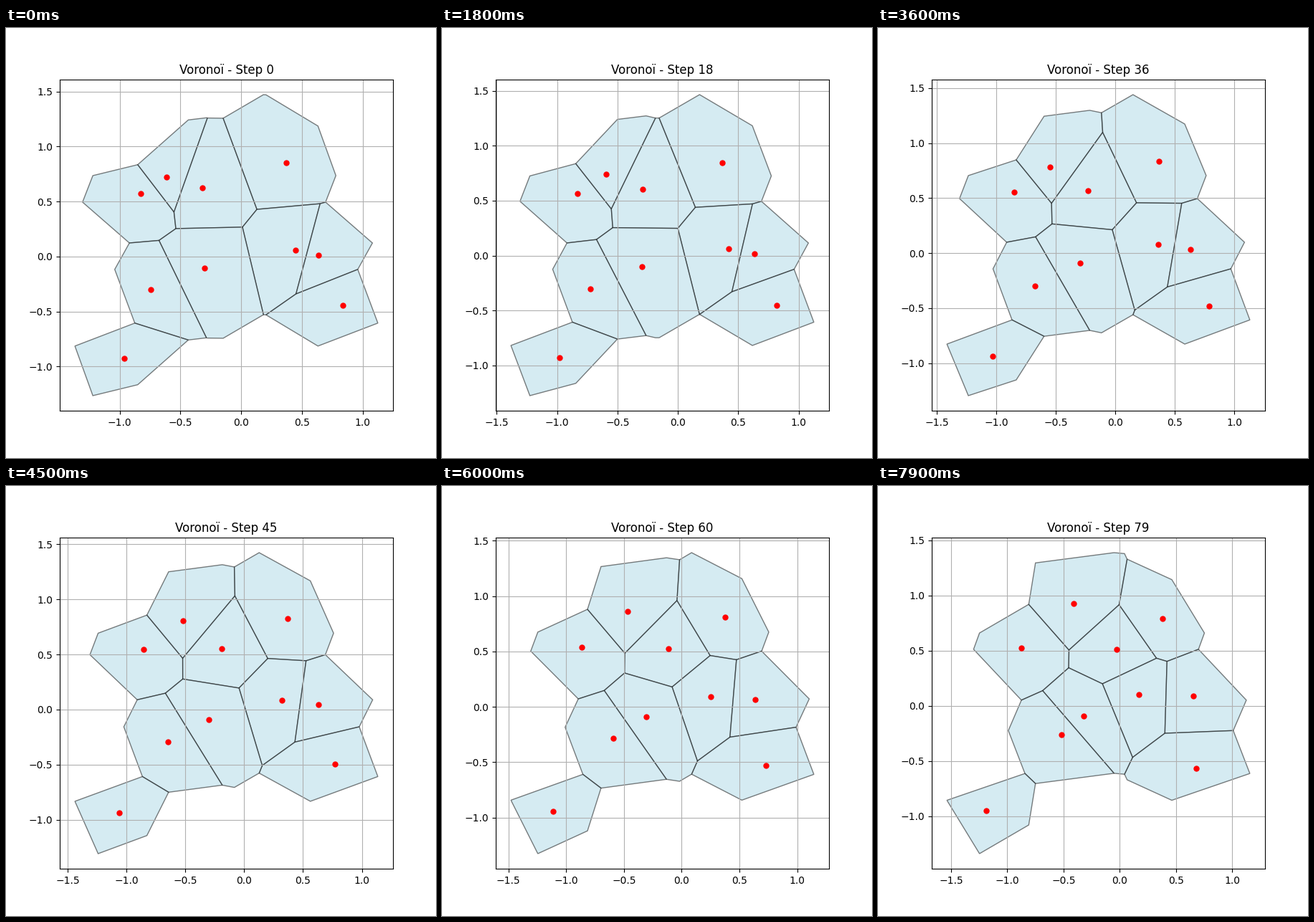
Animation, 600 px wide and 600 px high, one loop 8 s. Source, as a matplotlib script:

```python
import numpy as np
import matplotlib.pyplot as plt
from matplotlib.animation import FuncAnimation

STEPS = 80
PERIOD = 2.0

# Each site drifts along a quadratic Bezier path: start, control, end
PATHS = np.array([
    [(-.826, .572), (-.865, .543), (-.875, .526)],
    [(-.614, .719), (-.506, .816), (-.410, .928)],
    [(-.319, .624), (-.174, .520), (-.028, .513)],
    [(.370, .855), (.367, .820), (.379, .792)],
    [(.449, .057), (.309, .092), (.169, .104)],
    [(.635, .012), (.621, .045), (.653, .090)],
    [(.835, -.444), (.765, -.502), (.679, -.565)],
    [(-.301, -.106), (-.287, -.080), (-.321, -.093)],
    [(-.743, -.301), (-.639, -.300), (-.518, -.260)],
    [(-.961, -.926), (-1.066, -.941), (-1.187, -.948)],
])

SHIFTS = PERIOD * np.array([(i, j) for i in (-1, 0, 1) for j in (-1, 0, 1)])
SQUARE = np.array([(-1, -1), (1, -1), (1, 1), (-1, 1)]) * PERIOD


def ease(s):
    """Start almost at rest and settle to a steady speed."""
    return 0.1 * s + 1.62 * s**2 - 0.72 * s**3


def sites_at(step):
    u = ease(step / (STEPS - 1))
    start, control, end = PATHS.transpose(1, 0, 2)
    return (1 - u)**2 * start + 2 * u * (1 - u) * control + u**2 * end


def clip(poly, p, q):
    """Keep the part of poly that is closer to p than to q."""
    side = (poly - (p + q) / 2) @ (q - p)
    if side.max() <= 0:
        return poly
    out = []
    for k in range(len(poly)):
        a, b = poly[k - 1], poly[k]
        sa, sb = side[k - 1], side[k]
        if (sa <= 0) != (sb <= 0):
            out.append(a + (b - a) * sa / (sa - sb))
        if sb <= 0:
            out.append(b)
    return np.array(out)


def cell(p, tiled):
    """Voronoi cell of p among all sites repeated on the torus."""
    dist = np.hypot(*(tiled - p).T)
    poly = p + SQUARE
    for k in np.argsort(dist)[1:]:
        if dist[k] > 2 * np.hypot(*(poly - p).T).max():
            break
        poly = clip(poly, p, tiled[k])
    return poly


fig, ax = plt.subplots(figsize=(6, 6), dpi=100)


def draw(step):
    ax.clear()
    sites = sites_at(step)
    tiled = (sites[:, None] + SHIFTS).reshape(-1, 2)
    for p in sites:
        ax.fill(*cell(p, tiled).T, facecolor="lightblue", edgecolor="black",
                alpha=0.5)
    ax.plot(*sites.T, "ro", markersize=5)
    ax.set_title(f"Voronoï - Step {step}")
    ax.grid(True)
    return []


anim = FuncAnimation(fig, draw, frames=STEPS, interval=100, repeat=True,
                     repeat_delay=0, init_func=lambda: draw(0))
plt.show()
```
